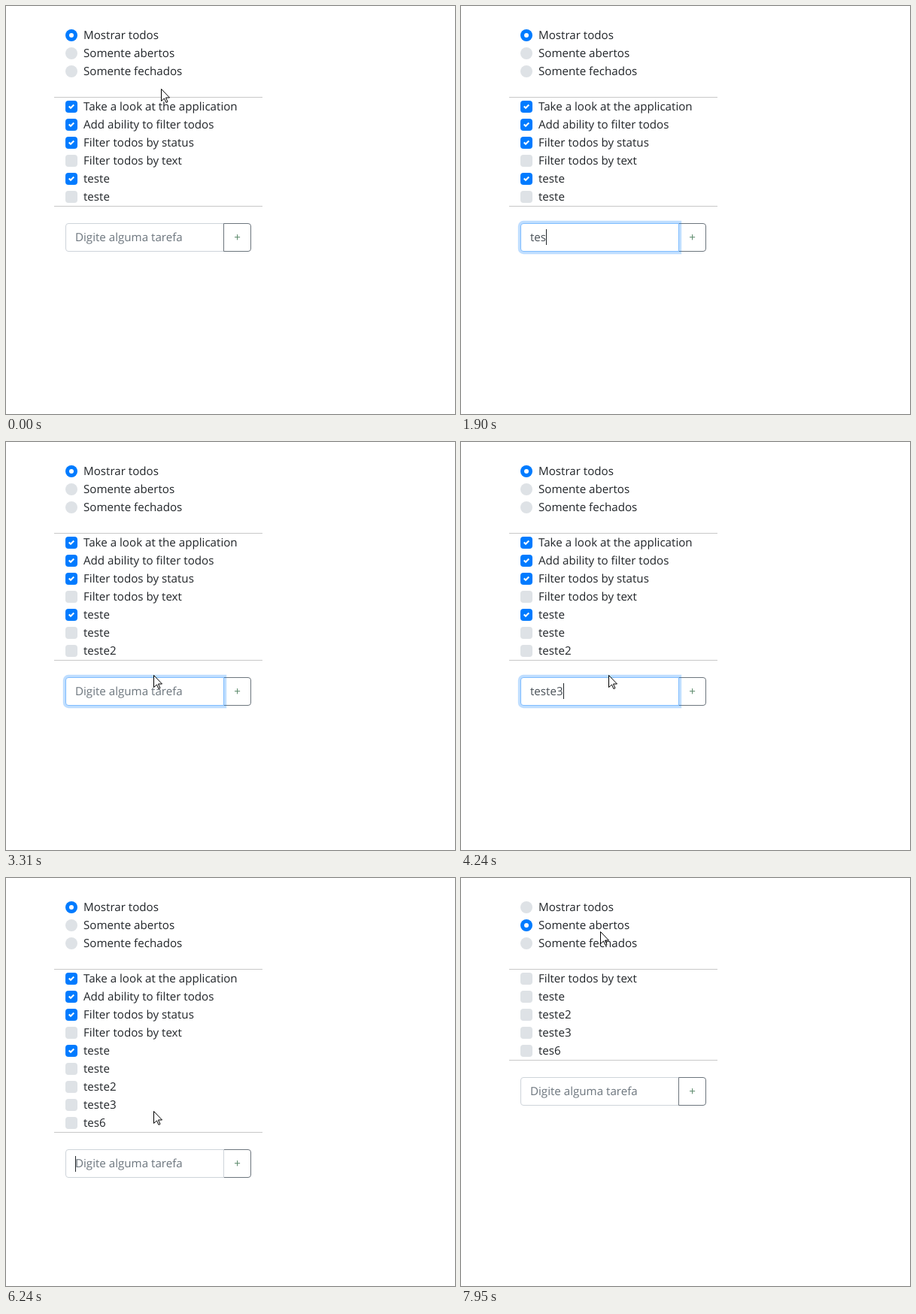
Write an HTML page that moves like this. It is 597x543 px and loops after 8000 ms.

```html
<!DOCTYPE html>
<html lang="pt">
<head>
<meta charset="utf-8">
<title>Lista de tarefas</title>
<style>
  html, body { margin: 0; width: 100%; height: 100%; overflow: hidden; background: #fff; }
  body {
    position: relative;
    font: 15.15px/24px "Open Sans", "Noto Sans", sans-serif;
    color: #212529;
    text-rendering: geometricPrecision;
    cursor: default;
  }
  #app { position: absolute; left: 64px; top: 27px; width: 277px; }
  ul { list-style: none; margin: 0; padding: 0; }
  li { position: relative; height: 24px; padding-left: 39px; white-space: nowrap; }
  .box {
    --on: 0;
    position: absolute; left: 15px; top: 4px; width: 16px; height: 16px;
    border-radius: 4px;
    background: color-mix(in srgb, #007bff calc(var(--on) * 100%), #dee2e6);
  }
  .box svg { position: absolute; left: 4px; top: 4px; width: 8px; height: 8px; fill: #fff; }
  #filters .box { border-radius: 50%; }
  #todos { margin-top: 22px; border: solid #c8c8c8; border-width: 1px 0; }
  #form { position: relative; height: 38px; margin: 22px 0 0 15px; }
  #field, #add { position: absolute; top: 0; height: 38px; box-sizing: border-box; }
  #field {
    --focus: 0;
    left: 0; width: 211px; padding: 6px 12px; white-space: nowrap;
    border: 1px solid color-mix(in srgb, #80bdff calc(var(--focus) * 100%), #ced4da);
    border-radius: 4px 0 0 4px;
    box-shadow: 0 0 0 calc(var(--focus) * 3.2px) rgba(0, 123, 255, calc(var(--focus) * .25));
    background: #fff; color: #495057;
  }
  #field.active { z-index: 3; }
  #hint { color: #6c757d; }
  #caret { position: absolute; width: 1px; height: 21px; background: #212529; }
  #add {
    left: 210px; width: 37px; z-index: 2; line-height: 36px; text-align: center;
    border: 1px solid #6c757d; border-radius: 0 4px 4px 0; color: #5c8a6c;
  }
  .pointer { position: absolute; left: 0; top: 0; z-index: 9; overflow: visible; }
</style>
</head>
<body>
<div id="app">
  <ul id="filters"></ul>
  <ul id="todos"></ul>
  <div id="form">
    <div id="field"><span id="typed"></span><i id="caret"></i><span id="hint">Digite alguma tarefa</span></div>
    <div id="add">+</div>
  </div>
</div>
<svg class="pointer" id="arrow" width="12" height="19">
  <path d="M.5 .5V16.5L4.5 13L7 18.5L9 17.5L6.5 12H11.5Z" fill="#fff" stroke="#000"/>
</svg>
<svg class="pointer" id="beam" width="7" height="16">
  <path d="M0 .5H3M4 .5H7M3.5 1V15M0 15.5H3M4 15.5H7" fill="none" stroke="#000"/>
</svg>
<script>
  const LOOP = 8000;
  const $ = id => document.getElementById(id);
  const TICK = '<svg viewBox="0 0 8 8"><path d="M6.564.75l-3.59 3.612-1.538-1.55L0 4.26 2.974 7.25 8 2.193z"/></svg>';
  const DOT = '<svg viewBox="-4 -4 8 8"><circle r="3"/></svg>';

  function addRow(list, label, mark) {
    const row = document.createElement('li');
    row.innerHTML = `<span class="box">${mark}</span>${label}`;
    list.append(row);
    return row;
  }
  function setBox(row, level, marked) {
    row.firstChild.style.setProperty('--on', level);
    row.firstChild.firstChild.style.display = marked ? '' : 'none';
  }

  const filters = ['Mostrar todos', 'Somente abertos', 'Somente fechados']
    .map(label => addRow($('filters'), label, DOT));

  // label, done, time of appearance
  const todos = [
    ['Take a look at the application', 1, 0],
    ['Add ability to filter todos', 1, 0],
    ['Filter todos by status', 1, 0],
    ['Filter todos by text', 0, 0],
    ['teste', 1, 0],
    ['teste', 0, 0],
    ['teste2', 0, 2770],
    ['teste3', 0, 4700],
    ['tes6', 0, 6240]
  ].map(([label, done, born]) => {
    const row = addRow($('todos'), label, TICK);
    setBox(row, done, done);
    return { row, done, born };
  });

  const typeWord = (word, times, submit) =>
    [...times.map((t, i) => [t, word.slice(0, i + 1)]), [submit, '']];
  const typing = [
    [0, ''],
    ...typeWord('teste2', [1580, 1750, 1900, 2070, 2140, 2530], 2770),
    ...typeWord('teste3', [3540, 3610, 3780, 3930, 4010, 4240], 4700),
    ...typeWord('tes6', [5150, 5230, 5380, 5700], 6240)
  ];

  const focusIn = t => [[t, 0], [t + 60, .5], [t + 140, 1]];
  const focus = [
    [0, 0], ...focusIn(1060), ...focusIn(2770), ...focusIn(4700), ...focusIn(6240),
    [7320, .7], [7400, .3], [7480, 0]
  ];
  const caret = [[0, 0], [1060, 1], [3310, 0], [3540, 1], [6770, 0]];
  const openOnly = [[0, 0], [7560, .5], [7640, .85], [7720, 1]];

  const arrowDown = [
    [202, 98], [196, 84], [191, 82], [188, 100], [186, 140],
    [186, 190], [188, 240], [192, 278]
  ].map(([x, y], i) => [200 + 78 * i, 'arrow', x, y]);
  const pointer = [
    [0, 'arrow', 206, 110],
    ...arrowDown,
    [824, 'beam', 196, 302], [902, 'beam', 197, 311], [980, 'beam', 197, 305],
    [1350, 'beam', 196, 304], [1430, 'beam', 195, 304], [1660, 'none', 0, 0],
    [2770, 'arrow', 196, 310],
    [6770, 'arrow', 199, 304], [6850, 'arrow', 194, 286], [6940, 'arrow', 185, 255],
    [7030, 'arrow', 183, 160], [7100, 'arrow', 184, 57], [7170, 'arrow', 185, 70],
    [7950, 'arrow', 185, 71]
  ];

  // Latest entry whose time has been reached
  const at = (track, t) => track.findLast(step => step[0] <= t);

  function render(t) {
    const level = at(openOnly, t)[1];
    const filtered = level > 0;
    setBox(filters[0], 1 - level, !filtered);
    setBox(filters[1], level, filtered);
    setBox(filters[2], 0, false);
    for (const { row, done, born } of todos)
      row.style.display = t >= born && !(filtered && done) ? '' : 'none';

    const text = at(typing, t)[1];
    $('typed').textContent = text;
    $('hint').style.display = text ? 'none' : '';
    $('caret').style.display = at(caret, t)[1] ? '' : 'none';
    $('caret').style.top = text ? '7px' : '8px';
    $('field').style.setProperty('--focus', at(focus, t)[1]);
    $('field').classList.toggle('active', t >= 1060 && t < 7320);

    const [, kind, x, y] = at(pointer, t);
    for (const id of ['arrow', 'beam']) {
      $(id).style.display = id === kind ? '' : 'none';
      $(id).style.transform = `translate(${x}px, ${y}px)`;
    }
  }

  const start = performance.now();
  function loop() {
    render((performance.now() - start) % LOOP);
    requestAnimationFrame(loop);
  }
  loop();
</script>
</body>
</html>
```
